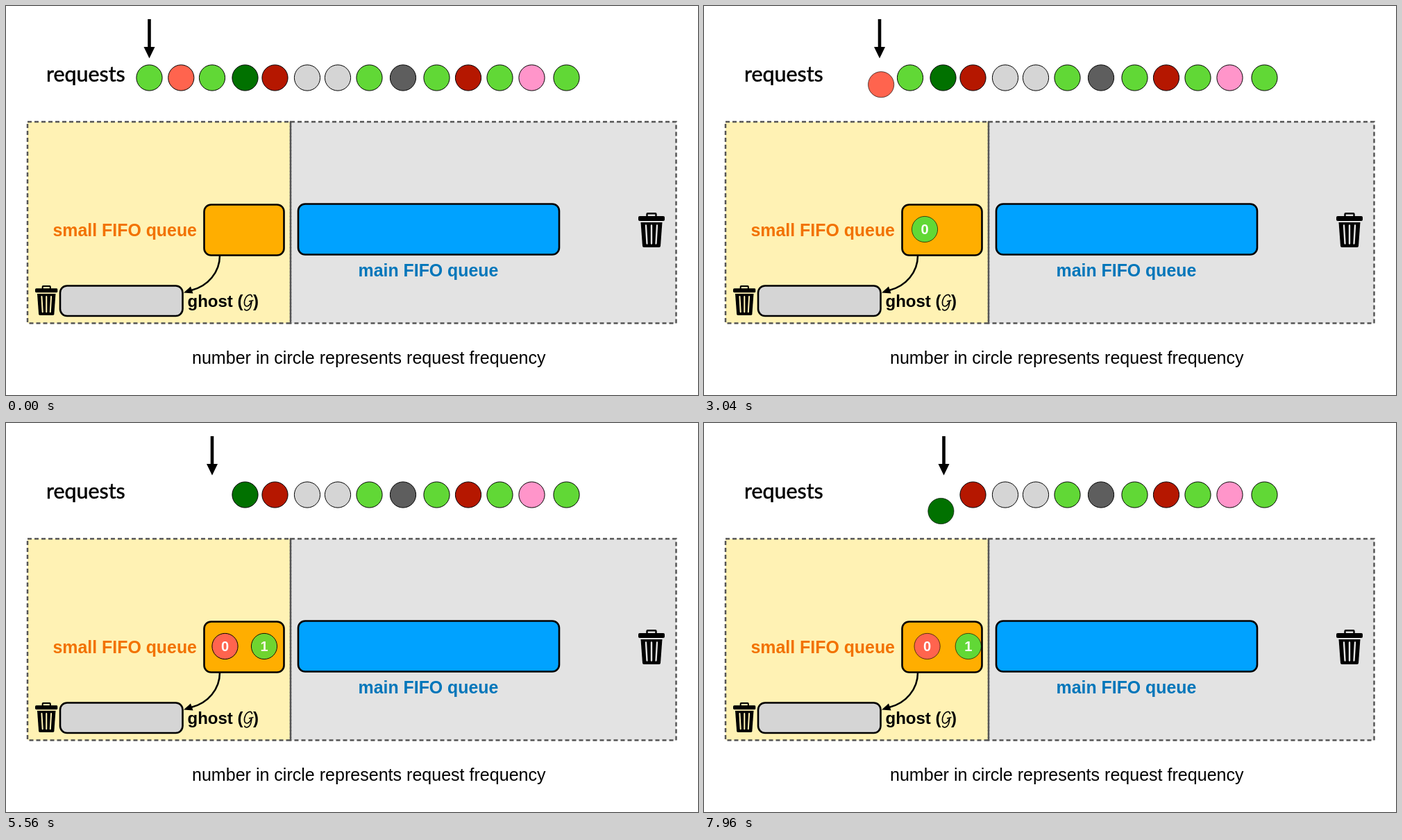
Recreate the animation shown at these times as an HTML page. Size 997 by 561 pixels, loop 8000 ms.

```html
<!DOCTYPE html>
<html lang="en">
<head>
<meta charset="utf-8">
<title>FIFO queues</title>
<style>
  html, body { margin: 0; height: 100%; overflow: hidden; background: #fff; }
  svg { display: block; width: 100vw; height: 100vh; }
  text { font-family: "Liberation Sans", Arial, sans-serif; font-size: 24.9px; }
  .bold { font-weight: bold; }
  .area { fill: none; stroke: #555; stroke-width: 2.5; stroke-dasharray: 6 4; }
  .queue { stroke: #000; stroke-width: 2.6; }
  .ball text { fill: #fff; font-size: 20px; font-weight: bold; text-anchor: middle; }
</style>
</head>
<body>
<svg id="stage" viewBox="0 0 997 561">
  <defs>
    <symbol id="bin" viewBox="0 0 38 50" preserveAspectRatio="none">
      <path d="M12.5 7V2.2Q12.5 1.2 13.5 1.2H24.5Q25.5 1.2 25.5 2.2V7" fill="none" stroke="#000" stroke-width="2.4"/>
      <rect y="5" width="38" height="7" rx="2"/>
      <path d="M3.5 14H34.5L32 48Q31.8 50 30 50H8Q6.2 50 6 48Z"/>
      <path d="M11 18.5L12.5 44.5M19 18.5V44.5M27 18.5L25.5 44.5" stroke="currentColor" stroke-width="2.4" stroke-linecap="round"/>
    </symbol>
  </defs>

  <rect x="31" y="167" width="379" height="290.5" fill="#fff2b4"/>
  <rect x="410" y="167" width="555.5" height="290.5" fill="#e3e3e3"/>
  <rect class="area" x="31" y="167" width="379" height="290.5"/>
  <rect class="area" x="410" y="167" width="555.5" height="290.5"/>
  <rect class="queue" x="285.5" y="286.5" width="115" height="73" rx="10" fill="#ffae00"/>
  <rect class="queue" x="421" y="285.5" width="376" height="73" rx="10" fill="#00a2ff"/>
  <rect class="queue" x="78" y="403.5" width="176.5" height="43.5" rx="10" fill="#d5d5d5"/>
  <use href="#bin" x="911" y="298" width="38" height="50" color="#e3e3e3"/>
  <use href="#bin" x="42" y="403" width="32.5" height="43" color="#fff2b4"/>

  <path d="M308 360C308 384 291 404 267 410" fill="none" stroke="#000" stroke-width="2.5"/>
  <path d="M256 413.5L266 404.5L269.5 414.5Z"/>

  <text x="58" y="109" stroke="#000" stroke-width=".5" style="font-family:Lato,sans-serif;font-size:30.4px">requests</text>
  <text class="bold" x="67.5" y="332" fill="#f27200">small FIFO queue</text>
  <text class="bold" x="507.5" y="390" fill="#0076ba">main FIFO queue</text>
  <text class="bold" x="261.5" y="433.5" style="font-size:24px">ghost (</text>
  <path d="M354.5 420C354.5 414.5 348 415.5 345 421.5C342 428 343.5 433.5 347.5 433C351 432.5 353 428 354 425C353.5 432 352 438.5 347 439C344.5 439 343.5 437.5 344 436.5M350 426L356.5 424.5" fill="none" stroke="#000" stroke-width="1.6"/>
  <text class="bold" x="356" y="433.5" style="font-size:24px">)</text>
  <text x="268" y="516" style="font-size:25.05px">number in circle represents request frequency</text>

  <path id="arrow" d="M-2.3 19H2.3V59H8L0 75.5L-8 59H-2.3Z"/>
</svg>
<script>
const LOOP = 8000, STEP = 40, SPAN = 970;
const ROW = 103.5, QUEUE = 322, SLOTS = [315.5, 372, 453];
const POINTS = [206.5, 253, 297, 345.5];
const green = '#61d836', red = '#b51700', gray = '#d5d5d5';
const requests = [
  [206.5, green], [252.3, '#ff644e'], [297, green], [344.5, '#017100'], [387.5, red],
  [434, gray], [478, gray], [523.5, green], [572, '#5e5e5e'], [620.5, green],
  [666, red], [711.5, green], [757.5, '#ff95ca'], [807.5, green]
];
const stage = document.getElementById('stage');
const arrow = document.getElementById('arrow');

function add(parent, name, attrs) {
  const el = document.createElementNS('http://www.w3.org/2000/svg', name);
  for (const key in attrs) el.setAttribute(key, attrs[key]);
  return parent.appendChild(el);
}

const balls = requests.map(([x, color]) => {
  const group = add(stage, 'g', { class: 'ball', transform: `translate(${x} ${ROW})` });
  const disc = add(group, 'circle', { r: 18.6, fill: color, stroke: '#000' });
  const label = add(group, 'text', { y: 7, opacity: 0 });
  label.textContent = '0';
  return { x, group, disc, label };
});

const mix = (a, b, f) => a + (b - a) * f;

function progress(time, start) {
  const t = Math.min(1, Math.max(0, (time - start) / SPAN));
  return t < .5 ? 2 * t * t : 1 - 2 * (1 - t) ** 2;
}

// Drops a ball into the first slot, then shifts it along the queue.
function place(ball, enter, ...shifts) {
  const x = shifts.reduce((x, f, i) => x + (SLOTS[i + 1] - SLOTS[i]) * f,
    mix(ball.x, SLOTS[0], enter));
  const moving = [enter, ...shifts].some(f => f > 0 && f < 1);
  ball.group.setAttribute('transform', `translate(${x} ${mix(ROW, QUEUE, enter)})`);
  ball.disc.setAttribute('stroke-opacity', moving ? .65 : 1);
  ball.label.setAttribute('opacity', Math.max(0, 2 * enter - 1));
}

function draw(time) {
  const [first, second, hit, fourth] = [466, 2895, 5335, 7735].map(s => progress(time, s));
  const [a, b, c, d] = balls;
  const pointer = [1925, 4365, 6765].reduce(
    (x, s, i) => x + (POINTS[i + 1] - POINTS[i]) * progress(time, s), POINTS[0]);
  arrow.setAttribute('transform', `translate(${pointer} 0)`);
  place(a, first, second, fourth);
  place(b, second, fourth);
  place(d, fourth);

  // A repeated request raises the count while its ball cross-fades.
  a.label.textContent = hit > 0 ? '1' : '0';
  a.group.setAttribute('opacity', 1 - hit * (1 - hit));
  c.group.setAttribute('visibility', hit > 0 ? 'hidden' : 'visible');
}

let origin;
function tick(now) {
  origin ??= now;
  draw(Math.floor((now - origin) % LOOP / STEP) * STEP);
  requestAnimationFrame(tick);
}
draw(0);
requestAnimationFrame(tick);
</script>
</body>
</html>
```
